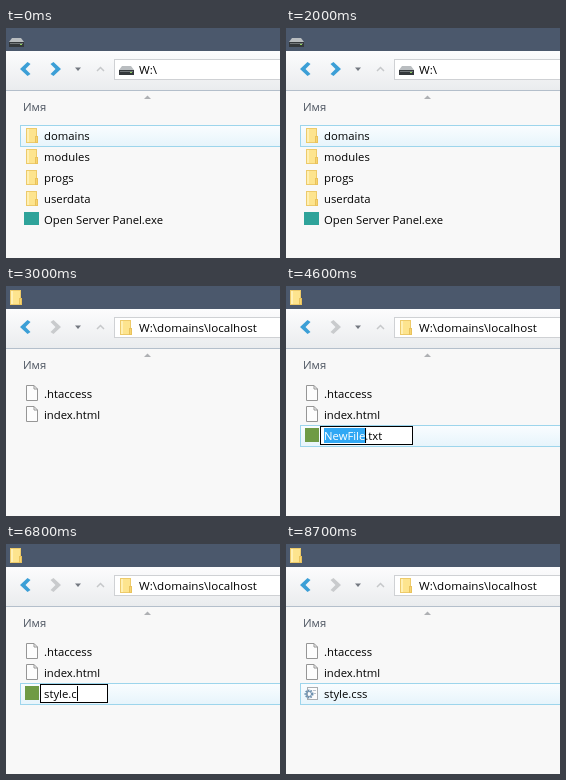
An HTML page with a canvas that plays this animation: 274x230 px, repeating every 8800 ms.

```html
<!DOCTYPE html>
<html lang="ru">
<head>
<meta charset="utf-8">
<title>File manager</title>
<style>
  html, body { margin: 0; width: 100%; height: 100%; overflow: hidden; background: #f8f8f8; }
  canvas { display: block; }
</style>
</head>
<body>
<canvas id="stage" width="274" height="230"></canvas>
<script>
const ctx = document.getElementById('stage').getContext('2d');
const LOOP = 8800;
const LIST_FONT = '11.3px "Open Sans", sans-serif';
const PATH_FONT = '11.6px "Open Sans", sans-serif';

const ROOT = [
  ['folder', 'domains'], ['folder', 'modules'], ['folder', 'progs'],
  ['folder', 'userdata'], ['program', 'Open Server Panel.exe']
];
const DOMAINS = [['folder', 'house.local'], ['folder', 'localhost']];
const SITE = [['page', '.htaccess'], ['page', 'index.html']];

const root = hover => ({ path: 'W:\\', icon: 'drive', items: ROOT, hover, canForward: true });
const domains = hover => ({ path: 'W:\\domains', icon: 'folder', items: DOMAINS, hover });
const site = (extra, hover, edit) => ({
  path: 'W:\\domains\\localhost', icon: 'folder',
  items: extra ? [...SITE, extra] : SITE, hover, edit
});
const rename = (text, caret, selection) =>
  site(['note', ''], 2, { text, caret, selection });

const timeline = [
  [0, root(0)],
  [1800, root(1)],
  [2000, root(0)],
  [2200, domains()],
  [2700, domains(1)],
  [3000, site()],
  [4400, site(['note', 'NewFile.txt'])],
  [4600, rename('NewFile.txt', 7, [0, 7])],
  [4900, rename('NewFile.txt', null, [0, 7])],
  [5100, rename('s.txt', 1)],
  [5300, rename('st.txt', 2)],
  [5700, rename('sty.txt', 3)],
  [5800, rename('style.txt', 4)],
  [6000, rename('style.txt', 5)],
  [6300, rename('style.txt', 6)],
  [6500, rename('style.txt', 9, [6, 9])],
  [6800, rename('style.c', 7)],
  [6900, rename('style.cs', 8)],
  [7100, rename('style.css', 9)],
  [7700, site(['css', 'style.css'], 2)]
];

function rect(x, y, w, h, fill, stroke) {
  ctx.fillStyle = fill;
  ctx.fillRect(x, y, w, h);
  if (stroke) {
    ctx.strokeStyle = stroke;
    ctx.lineWidth = 1;
    ctx.strokeRect(x + .5, y + .5, w - 1, h - 1);
  }
}

function shade(top, bottom, from, to) {
  const gradient = ctx.createLinearGradient(0, top, 0, bottom);
  gradient.addColorStop(0, from);
  gradient.addColorStop(1, to);
  return gradient;
}

function shape(points, fill, stroke, width = 1) {
  ctx.beginPath();
  points.forEach(([x, y]) => ctx.lineTo(x, y));
  if (fill) {
    ctx.closePath();
    ctx.fillStyle = fill;
    ctx.fill();
  }
  if (stroke) {
    ctx.strokeStyle = stroke;
    ctx.lineWidth = width;
    ctx.stroke();
  }
}

function label(text, x, y, color = '#000', font = LIST_FONT) {
  ctx.font = font;
  ctx.fillStyle = color;
  ctx.fillText(text, x, y);
}

function gear(x, y, r) {
  ctx.strokeStyle = '#6b8fae';
  ctx.lineWidth = 2;
  ctx.setLineDash([1.5, 1]);
  ctx.beginPath();
  ctx.arc(x, y, r, 0, Math.PI * 2);
  ctx.stroke();
  ctx.setLineDash([]);
  ctx.lineWidth = 1;
  ctx.beginPath();
  ctx.arc(x, y, r - 1, 0, Math.PI * 2);
  ctx.stroke();
}

// Each icon occupies a 16 px cell.
const icons = {
  folder() {
    rect(2, 1, 11, 15, '#fde48e', '#edca6a');
    rect(3, 2, 2, 13, '#fff0b5');
    rect(11, 9, 3, 7, '#f7d571', '#e9c25c');
  },
  page() {
    shape([[2.5, .5], [10, .5], [13.5, 4], [13.5, 15.5], [2.5, 15.5]], '#fdfdfd', '#969696');
    shape([[10, .5], [10, 4], [13.5, 4]], null, '#969696');
  },
  program() { rect(0, 1, 15, 13, '#2fa39a'); },
  note() { rect(1, 1, 14, 14, '#6f9b45'); },
  css() {
    rect(3, 2, 11, 13, '#fdfdfd', '#a9adb1');
    rect(9, 5, 3, 1, '#b9c3cc');
    rect(10, 8, 2, 1, '#b9c3cc');
    gear(5, 9, 3.5);
  },
  drive() {
    shape([[3, 5], [12, 5], [15, 9], [0, 9]], '#b9bdc0');
    rect(0, 9, 15, 5, '#34383b');
    rect(1, 10, 13, 1, '#72777a');
    rect(11, 11, 2, 1, '#8ed45d');
  }
};

function icon(name, x, y) {
  ctx.save();
  ctx.translate(x, y);
  icons[name]();
  ctx.restore();
}

function chevron(x, direction, color) {
  ctx.save();
  ctx.translate(x, 41);
  ctx.scale(direction, 1);
  shape([[-6, 0], [1.5, -7], [4.5, -5], [-.5, 0], [4.5, 5], [1.5, 7]], color);
  ctx.restore();
}

function drawWindow({ path, icon: place, canForward }) {
  const isDrive = place === 'drive';
  rect(0, 0, 274, 230, '#f8f8f8');
  rect(0, 0, 274, 23, '#4b586c');
  rect(0, 23, 274, 39, shade(23, 62, '#fcfcfd', '#eaecee'));
  rect(0, 62, 274, 1, '#b4bfcb');
  icon(place, isDrive ? 3 : 2, isDrive ? 5 : 3);

  chevron(20, 1, '#3c9fd6');
  chevron(49, -1, canForward ? '#3c9fd6' : '#c9cbcd');
  shape([[69, 39.5], [75, 39.5], [72, 43]], '#737880');
  shape([[91, 43], [94.5, 39.5], [98, 43]], null, '#c6c8ca', 1.5);

  rect(108, 31, 168, 21, '#fff', '#cfd1d4');
  icon(place, isDrive ? 113 : 112, 33);
  label(path, 133, 45.5, '#000', PATH_FONT);

  label('Имя', 17, 83, '#4b535f');
  shape([[138, 71], [141.5, 67.5], [145, 71]], '#aeb0b3');
}

function drawEditor({ text, caret, selection }) {
  const left = 38, baseline = 154;
  ctx.font = LIST_FONT;
  const at = index => left + ctx.measureText(text.slice(0, index)).width;
  rect(34, 140, Math.round(at(text.length)) + 31 - 34, 19, '#fff', '#000');
  label(text, left, baseline);
  if (selection) {
    const [from, to] = selection.map(at);
    ctx.save();
    ctx.beginPath();
    ctx.rect(from, 142, to - from + 1, 15);
    ctx.clip();
    rect(from, 142, to - from + 1, 15, '#31a8f4');
    label(text, left, baseline, '#fff');
    ctx.restore();
  }
  if (caret != null) rect(Math.round(at(caret)), 142, 1, 15, '#000');
}

function drawList({ items, hover, edit }) {
  items.forEach(([kind, name], row) => {
    const top = 97 + row * 21;
    if (row === hover) rect(14, top, 262, 22, shade(top, top + 22, '#fafdff', '#e6f4fb'), '#9dd5ec');
    icon(kind, 18, top + 2);
    label(name, 38, top + 15);
  });
  if (edit) drawEditor(edit);
}

function draw(now) {
  const time = now % LOOP;
  const [, state] = timeline.findLast(([start]) => start <= time);
  drawWindow(state);
  drawList(state);
}

function tick() {
  draw(performance.now());
  requestAnimationFrame(tick);
}
tick();
</script>
</body>
</html>
```
